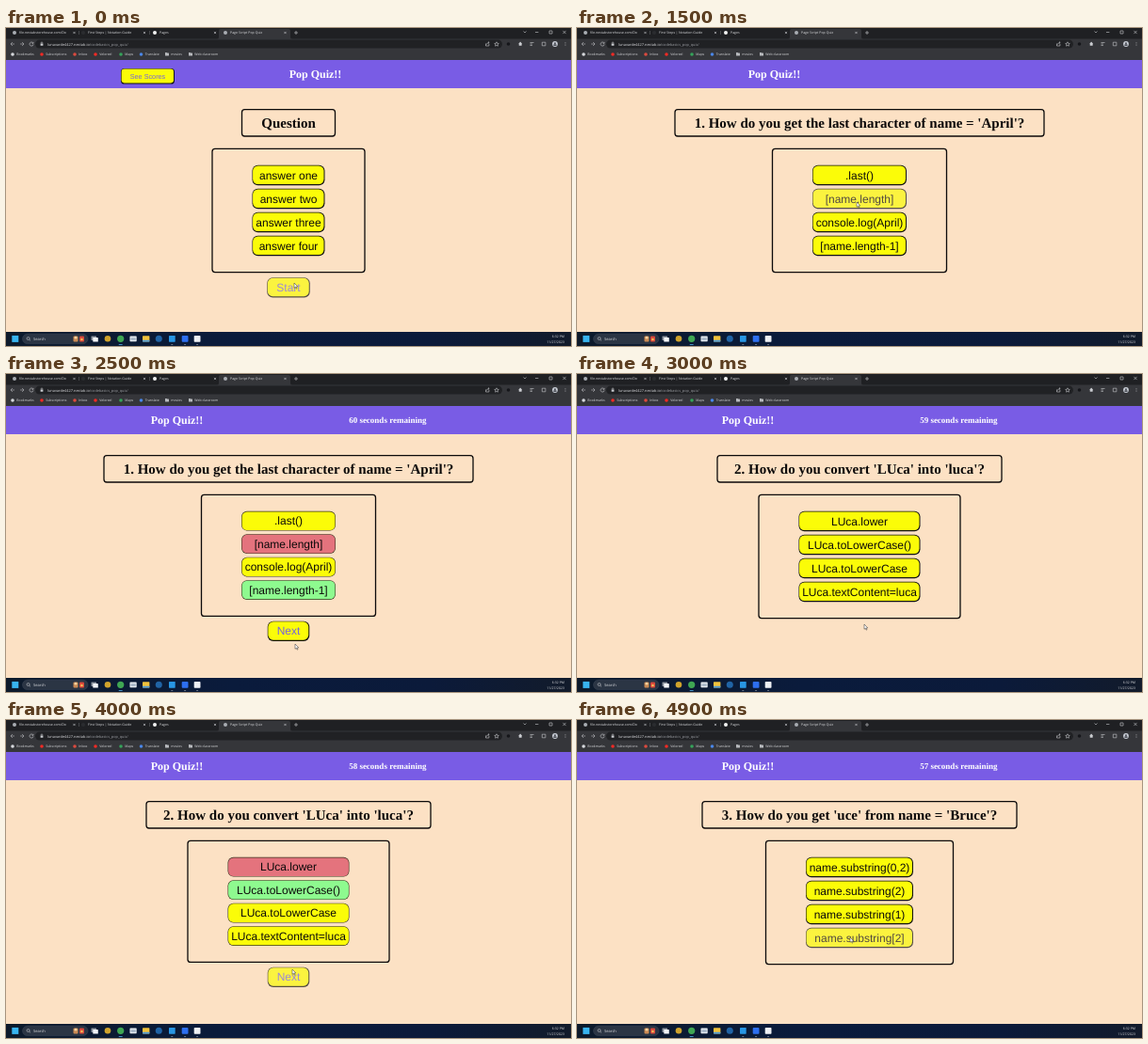
Write an HTML page that moves like this. It is 600x338 px and loops after 5 s.

```html
<!DOCTYPE html>
<html lang="en">
<head>
<meta charset="utf-8">
<title>Pop Quiz</title>
<style>
  html, body { margin: 0; width: 100%; height: 100%; overflow: hidden; background: #fce1c4; }
  svg { display: block; width: 100vw; height: 100vh; }
  text { text-rendering: geometricPrecision; white-space: pre; }
  .ui { font-family: "Open Sans", "Noto Sans", sans-serif; font-size: 3.55px; fill: #dcdde0; }
  .serif { font-family: "Liberation Serif", "Times New Roman", serif; font-weight: bold; text-anchor: middle; }
  .sans { font-family: "Liberation Sans", Arial, sans-serif; text-anchor: middle; }
  .line { fill: none; stroke: #c9cbcf; stroke-width: .6; }
</style>
</head>
<body>
<svg viewBox="0 0 600 338" preserveAspectRatio="none">
  <defs>
    <linearGradient id="bar">
      <stop offset="0" stop-color="#0d1a2b"/>
      <stop offset=".4" stop-color="#0a1b3c"/>
      <stop offset=".75" stop-color="#0b1a3a"/>
      <stop offset="1" stop-color="#121b2b"/>
    </linearGradient>
  </defs>
  <g id="chrome"></g>
  <g id="page"></g>
  <path id="cursor" d="M0 0V6.2L1.5 4.9L2.5 7.2L3.5 6.8L2.5 4.6H4.5Z" fill="#fff" stroke="#333" stroke-width=".6"/>
</svg>
<script>
const LOOP = 5000, STEP = 100;
const YELLOW = '#fbfc08', RED = '#e4737d', GREEN = '#8efa8f', VIOLET = '#7764dc', INK = '#0c0a0a';

const rect = (x, y, w, h, fill, r = 0, extra = '') =>
  `<rect x="${x}" y="${y}" width="${w}" height="${h}" rx="${r}" fill="${fill}" ${extra}/>`;
const dot = (x, y, r, fill) => `<circle cx="${x}" cy="${y}" r="${r}" fill="${fill}"/>`;
const line = (d, extra = '') => `<path class="line" d="${d}" ${extra}/>`;
const text = (cls, x, y, str, extra = '') => `<text class="${cls}" x="${x}" y="${y}" ${extra}>${str}</text>`;
const cross = (x, y, r) => line(`M${x - r} ${y - r}l${2 * r} ${2 * r}m0 ${-2 * r}l${-2 * r} ${2 * r}`);

function drawTabs() {
  const tabs = [
    [9, 'file.nestabstorehouse.com/Do', '#a9adb3'],
    [82, 'First Steps | Notation Guide', '#2b2c30'],
    [158, 'Pages', '#f2f2f2'],
    [233, 'Page Script Pop Quiz', '#a9adb3']
  ];
  let out = rect(0, 0, 600, 12, '#1f2023');
  out += '<path d="M224 12Q226 12 226 9.5V3Q226 1 228 1H300Q302 1 302 3V9.5Q302 12 304 12Z" fill="#35363a"/>';
  tabs.forEach(([x, label, color], i) => {
    out += dot(x, 5, 2, color) + text('ui', x + 5, 6.3, label);
    out += cross([72.5, 147, 222, 296.5][i], 5, 1.1);
  });
  out += line('M77.5 3v4M152.5 3v4', 'opacity=".4"');
  out += line('M306 5h4M308 3v4M549.5 3.5l1.5 1.5l1.5 -1.5M562 4.5h3.4M577 3h3v3h-3z');
  return out + cross(593, 4.5, 1.6);
}

function drawToolbar() {
  let out = rect(0, 11.5, 600, 22.5, '#35363a') + rect(31, 12.6, 496, 9, '#202124', 4.5);
  out += line('M9 17H5M7 15l-2 2l2 2M15 17h4M17 15l2 2l-2 2', 'opacity=".85"');
  out += line('M28.6 15.8A2 2 0 1 0 29 17.4M29 14.8v1.5h-1.5');
  out += rect(36.6, 16.5, 2.8, 2.3, '#c9cbcf', .3) + line('M37.2 16.5v-.8a.8 .8 0 0 1 1.6 0v.8', 'stroke-width=".4"');
  out += `<text class="ui" x="44" y="18.5" style="font-size:3.9px">lunavarde4427.nestab.io<tspan fill="#9a9da2">/codebasics_pop_quiz/</tspan></text>`;
  out += line('M509.5 16.5v2.5h3.4v-2M510.5 17.5q.2-2 2.5-2M512 14.5l1.2 1l-1.2 1', 'stroke-width=".45"');
  out += line('M521 14.8l.7 1.5l1.6 .2l-1.2 1.1l.3 1.6l-1.4-.8l-1.4 .8l.3-1.6l-1.2-1.1l1.6-.2z', 'stroke-width=".45"');
  out += dot(533.5, 17, 1.8, '#15161a') + rect(544.7, 15.7, 3, 3, '#c9cbcf', .5) + dot(546.2, 15.5, .8, '#c9cbcf');
  out += line('M556.5 15.5h4M556.5 17h2.4M556.5 18.5h2.4') + line('M569.3 15.2h3.6v3.6h-3.6z');
  out += dot(583, 17, 2.9, '#c9cdd6') + dot(583, 16.3, 1, '#4a4d55') + rect(581.3, 17.3, 3.4, 1.8, '#4a4d55', .8);
  return out + [15.4, 17, 18.6].map(y => dot(594, y, .45, '#d5d6d9')).join('');
}

function drawBookmarks() {
  const items = [
    [7, 'Bookmarks', '#d6d8dc'], [38, 'Subscriptions', '#f02a25'], [73, 'Inbox', '#dc4a3f'],
    [95, 'Veloreel', '#f02a25'], [122, 'Maps', '#35a35a'], [143.5, 'Translate', '#4a86e8'],
    [171, 'movies'], [196, 'Web classroom']
  ];
  return items.map(([x, label, color]) =>
    (color ? dot(x, 28, 1.8, color) : rect(x - 2, 26.6, 4, 3, '#b7b9bd', .4) + rect(x - 2, 26.1, 1.8, 1, '#b7b9bd', .3)) +
    text('ui', x + 4.3, 29.4, label, 'style="font-size:3.5px"')).join('');
}

function drawTaskbar() {
  let out = rect(0, 323, 600, 15, 'url(#bar)') + rect(6.3, 326.9, 7, 7, '#38b4f0');
  out += rect(17.5, 325.2, 69.5, 10.4, '#2b3544', 5.2, 'stroke="#465061" stroke-width=".4"');
  out += '<circle class="line" cx="23.6" cy="330" r="1.5"/>' + line('M24.7 331.1l1.3 1.3');
  out += text('ui', 29, 331.9, 'Search', 'style="font-size:4.1px"');
  out += rect(71.5, 327.4, 5, 6, '#c98a54', 1) + dot(74, 329.2, 1.4, '#f3d3a0') + rect(78, 327.4, 5, 6, '#d8483c', 1) + dot(80.5, 331, 1.2, '#f4c558');
  out += rect(90.5, 327.4, 5.5, 4.5, '#8d949f', .4) + rect(92.3, 329, 5.5, 4.6, '#f2f4f7', .4);
  out += dot(108, 330.3, 3.3, '#d0a32c') + dot(121.7, 330.3, 3.6, '#3fa653');
  out += rect(131.5, 327.4, 7.2, 5.8, '#e8edf2', .6) + rect(132.5, 329, 5.2, 3, '#aebccb');
  out += rect(145, 327.2, 7.4, 6.2, '#f2c23c', .6) + rect(145, 331.7, 7.4, 1.7, '#4a9be0', .4);
  out += dot(162.3, 330.3, 3.5, '#2064a6') + rect(173, 327, 6.7, 6.7, '#2896e4', .6);
  out += rect(186.7, 326.9, 6.8, 6.8, '#2d6ff0', 1) + rect(199.7, 326.9, 6.8, 6.8, '#eef0f4', .8);
  out += [121.7, 176.3, 190.1, 203.1].map((x, i) =>
    rect(x - (i ? 1 : 2), 336, i ? 2 : 4, .7, i ? '#8993a1' : '#58b8f2', .3)).join('');
  return out + text('ui', 593, 329.3, '6:32 PM', 'text-anchor="end"') + text('ui', 593, 335.1, '11/27/2023', 'text-anchor="end"');
}

const blank = { title: 'Question', titleW: 99, w: 77, answers: ['answer one', 'answer two', 'answer three', 'answer four'] };
const quiz = [
  { title: "1. How do you get the last character of name = 'April'?", titleW: 392, w: 100, wrong: 1, right: 3,
    answers: ['.last()', '[name.length]', 'console.log(April)', '[name.length-1]'] },
  { title: "2. How do you convert 'LUca' into 'luca'?", titleW: 302, w: 129, wrong: 0, right: 1,
    answers: ['LUca.lower', 'LUca.toLowerCase()', 'LUca.toLowerCase', 'LUca.textContent=luca'] },
  { title: "3. How do you get 'uce' from name = 'Bruce'?", titleW: 334, w: 114,
    answers: ['name.substring(0,2)', 'name.substring(2)', 'name.substring(1)', 'name.substring[2]'] }
];

// Moments of the clicks and of the first timer tick
const START = 900, TICK = 1900;
const rounds = [
  { from: START, answered: 2000 },
  { from: 2800, answered: 3700 },
  { from: 4400, answered: Infinity }
];

// Pointer tip: time, x, y
const path = [
  [0, 306, 271], [600, 310, 274], [900, 310, 274], [1300, 336, 184], [1500, 297, 185], [2000, 297, 185],
  [2400, 307, 291], [2500, 307, 287], [2800, 306, 272], [3000, 305, 266], [3400, 295, 166], [3700, 295, 162],
  [4000, 304, 265], [4400, 304, 267], [4800, 299, 248], [4900, 290, 231], [5000, 290, 231]
];

function pointer(t) {
  const i = path.findIndex(p => p[0] > t);
  const [t0, x0, y0] = path[i - 1], [t1, x1, y1] = path[i];
  const k = (t - t0) / (t1 - t0), e = k * k * (3 - 2 * k);
  return [x0 + (x1 - x0) * e, y0 + (y1 - y0) * e];
}

function button(cx, y, w, h, label, tip, { fill = YELLOW, color = INK, size = 12, flat = false } = {}) {
  const x = cx - w / 2, r = size / 2;
  const hover = !flat && Math.abs(tip[0] - cx) < w / 2 && tip[1] >= y && tip[1] <= y + h;
  const right = flat ? .6 : 1, bottom = flat ? .6 : 1.2;
  return `<g opacity="${hover ? .7 : 1}">` +
    rect(x, y, w, h, flat ? '#3a3520' : '#111', r) +
    rect(x + .6, y + .6, w - .6 - right, h - .6 - bottom, fill, r - .6) +
    text('sans', cx, y + h / 2 - .1 + size * .355, label, `font-size="${size}" fill="${color}"`) + '</g>';
}

const frame = (w, y, h) => rect(300 - w / 2, y, w, h, 'none', 3, 'stroke="#0c0a0a" stroke-width="1.3"');

function drawPage(t, tip) {
  const n = rounds.filter(r => t >= r.from).length - 1;
  const q = n < 0 ? blank : quiz[n];
  const done = n >= 0 && t >= rounds[n].answered;
  const titleX = t < START ? 328.5 : t < TICK ? 209.5 : 181.5;
  let out = rect(0, 34, 600, 289, '#fce1c4') + rect(0, 34, 600, 30, '#795ce5');
  out += text('serif', titleX, 53.2, 'Pop Quiz!!', 'font-size="12" fill="#fff"');
  if (n < 0) out += button(150.5, 43, 57, 16.6, 'See Scores', tip, { color: VIOLET, size: 7.25 });
  if (t >= TICK) {
    const left = 60 - Math.floor((t - TICK) / 1000);
    out += text('serif', 405.3, 52.2, `${left} seconds remaining`, 'font-size="9" fill="#fff"');
  }
  out += frame(q.titleW, 86.7, 28.3) + text('serif', 300, 106.2, q.title, `font-size="15" fill="${INK}"`);
  out += frame(q.w + 85, 128.4, done ? 129 : 131.2);
  q.answers.forEach((label, i) => {
    const fill = done && i === q.wrong ? RED : done && i === q.right ? GREEN : YELLOW;
    out += button(300, 145.8 + i * (done ? 24.45 : 25), q.w, done ? 20.8 : 21.4, label, tip, { fill, flat: done });
  });
  if (n < 0) out += button(300, 265.2, 45.5, 21.2, 'Start', tip, { color: VIOLET });
  if (done) out += button(300, 262.7, 44.5, 21.2, 'Next', tip, { color: VIOLET });
  return out;
}

const page = document.getElementById('page');
const cursor = document.getElementById('cursor');
document.getElementById('chrome').innerHTML = drawTabs() + drawToolbar() + drawBookmarks() + drawTaskbar();

let shown = -1;
function render(ms) {
  const t = Math.floor((ms % LOOP) / STEP) * STEP;
  if (t === shown) return;
  shown = t;
  const tip = pointer(t);
  page.innerHTML = drawPage(t, tip);
  cursor.setAttribute('transform', `translate(${tip[0]} ${tip[1]}) scale(.85)`);
}

const begin = performance.now();
function loop() {
  render(performance.now() - begin);
  requestAnimationFrame(loop);
}
loop();
</script>
</body>
</html>
```
